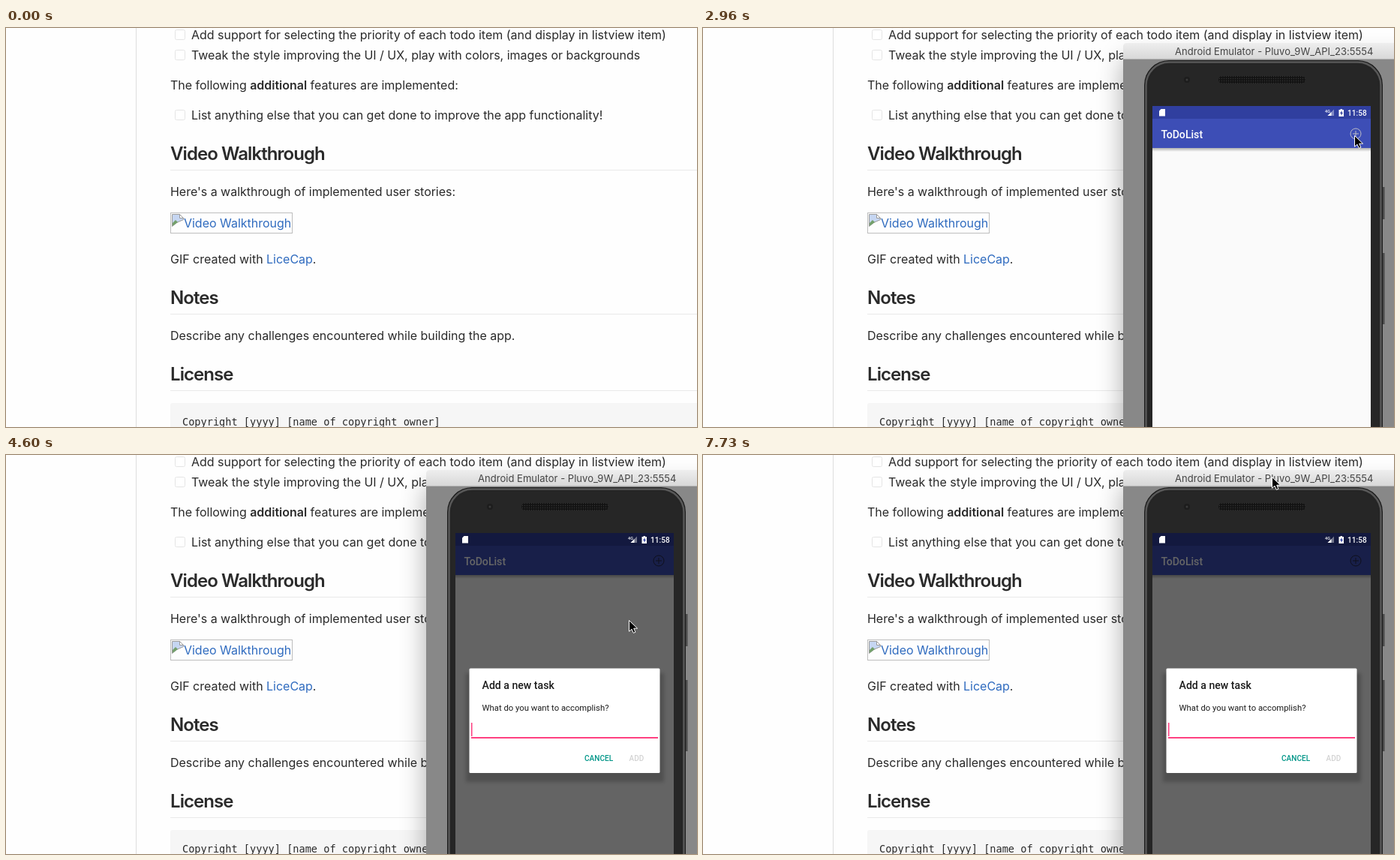
Recreate the animation shown at these times as an HTML page. Size 921 px wide and 532 px high, loop 8000 ms.

```html
<!DOCTYPE html>
<html lang="en">
<head>
<meta charset="utf-8">
<title>To-do list walkthrough</title>
<style>
  html, body { margin: 0; width: 100%; height: 100%; overflow: hidden; background: #fefefe; }
  svg { display: block; width: 921px; height: 532px; }
  text { white-space: pre; }
  .page { font: 16px Inter, sans-serif; letter-spacing: -.02px; fill: #2a2a2a; }
  .page .head { font-size: 24px; font-weight: 600; letter-spacing: -.93px; }
  .page .code { font: 13.6px "DejaVu Sans Mono", monospace; letter-spacing: 0; }
  .page .link { fill: #2f6bbf; }
  .bold { font-weight: 600; }
  .rule { stroke: #eaeaea; }
  .box { fill: #fff; stroke: #e4e4e4; }
  .title { font: 13px Inter, sans-serif; letter-spacing: .03px; fill: #444; }
  .ui { font-family: Roboto, sans-serif; }
  .med { font-weight: 500; }
</style>
</head>
<body>
<svg viewBox="0 0 921 532">
  <defs>
    <linearGradient id="bar" x2="0" y2="1">
      <stop stop-color="#eee"/><stop offset="1" stop-color="#d8d8d8"/>
    </linearGradient>
    <linearGradient id="drop" x2="0" y2="1">
      <stop stop-opacity=".3"/><stop offset="1" stop-opacity="0"/>
    </linearGradient>
    <pattern id="mesh" width="3" height="3" patternUnits="userSpaceOnUse">
      <rect width="3" height="3" fill="#131313"/><circle cx="1.5" cy="1.5" r=".7" fill="#343434"/>
    </pattern>
    <filter id="soft" x="-20%" y="-20%" width="140%" height="140%">
      <feGaussianBlur stdDeviation="17"/>
    </filter>
    <filter id="near" x="-20%" y="-20%" width="140%" height="140%">
      <feGaussianBlur stdDeviation="2.5"/>
    </filter>
    <clipPath id="screen"><path d="M599 104h291v428h-291z"/></clipPath>
  </defs>

  <rect width="921" height="532" fill="#fefefe"/>
  <path d="M173.5 0V532" stroke="#ddd"/>
  <g class="page">
    <path class="rule" d="M219 189.500H921M219 381.500H921M219 483.500H921"/>
    <rect class="box" x="225.500" y="2.500" width="13" height="13" rx="2"/>
    <rect class="box" x="225.500" y="29.500" width="13" height="13" rx="2"/>
    <rect class="box" x="225.500" y="109.500" width="13" height="13" rx="2"/>
    <text x="247" y="15">Add support for selecting the priority of each todo item (and display in listview item)</text>
    <text x="247" y="42">Tweak the style improving the UI / UX, play with colors, images or backgrounds</text>
    <text x="219" y="82">The following <tspan class="bold">additional</tspan> features are implemented:</text>
    <text x="247" y="122">List anything else that you can get done to improve the app functionality!</text>
    <text class="head" x="219" y="176">Video Walkthrough</text>
    <text x="219" y="224">Here's a walkthrough of implemented user stories:</text>
    <rect x="219.500" y="246.500" width="162" height="27" fill="none" stroke="#bdbdbd"/>
    <path d="M221.500 264.500v-16h10l5 5v2l-9 4z" fill="#c6d6f2" stroke="#9a9a9a"/>
    <path d="M222 264v-4l4-4 3 3z" fill="#74a06c"/>
    <path d="M231.500 248.500v5h5z" fill="#fff" stroke="#9a9a9a"/>
    <text class="link" x="237" y="266">Video Walkthrough</text>
    <text x="219" y="314">GIF created with <tspan class="link">LiceCap</tspan>.</text>
    <text class="head" x="219" y="368">Notes</text>
    <text x="219" y="416">Describe any challenges encountered while building the app.</text>
    <text class="head" x="219" y="470">License</text>
    <rect x="219" y="500" width="720" height="60" rx="3" fill="#f6f6f6"/>
    <text class="code" x="235" y="530">Copyright [yyyy] [name of copyright owner]</text>
  </g>

  <g id="win" visibility="hidden">
    <rect x="560" y="42" width="420" height="600" opacity=".33" filter="url(#soft)"/>
    <path d="M560 41V25q0-5 5-5H921V41z" fill="url(#bar)"/>
    <path d="M560 41.500H921" stroke="#b0b0b0"/>
    <text class="title" x="629" y="36">Android Emulator - Pluvo_9W_API_23:5554</text>
    <path d="M560 42H921V532H560z" fill="#888"/>

    <path d="M907 212v43M907 300v95" stroke="#4b4b4b" stroke-width="3"/>
    <rect x="588" y="43" width="318" height="600" rx="33" fill="#1c1c1c"/>
    <rect x="590.500" y="45.500" width="313" height="600" rx="31" fill="#252525" stroke="#585858" stroke-width="2.500"/>
    <rect x="594" y="49" width="306" height="600" rx="28" fill="#262626"/>
    <rect x="687" y="64" width="116" height="10" rx="5" fill="url(#mesh)"/>
    <circle cx="645" cy="69" r="4" fill="#1d1d1d"/>
    <circle cx="645" cy="69" r="1.500" fill="#3c3c3c"/>

    <g clip-path="url(#screen)">
      <rect x="599" y="104" width="291" height="428" fill="#fafafa"/>
      <rect x="599" y="160" width="291" height="5" fill="url(#drop)"/>
      <rect x="599" y="104" width="291" height="17" fill="#303f9f"/>
      <rect x="599" y="121" width="291" height="39" fill="#3d4eb6"/>
      <text class="ui med" x="610.500" y="146.500" font-size="14.100" fill="#fff">ToDoList</text>
      <circle id="ripple" cx="870" cy="141" r="14" fill="#fff" opacity=".1"/>
      <g id="plus" fill="none" stroke="#bcbcc6">
        <circle cx="870" cy="141" r="7"/><path d="M866 141h8M870 137v8"/>
      </g>
      <rect id="dim" x="599" y="104" width="291" height="428"/>
      <g fill="#fff">
        <path d="M610.500 108h5.500v9.500h-8v-7z"/>
        <path d="M841 108.500v8.500h-8.500z" opacity=".4"/>
        <path d="M837.500 112v5h-5z"/>
        <path d="M849.500 108h2.500v1h2v9h-6.500v-9h2z"/>
        <path d="M851.500 110l-2.500 4h1.500v3l2.500-4.200h-1.500z" fill="#303f9f"/>
        <text class="ui med" x="829" y="112.500" font-size="5.500">4G</text>
        <text class="ui med" x="859" y="116.500" font-size="10.100">11:58</text>
      </g>
      <g id="dialog">
        <rect x="613" y="291" width="264" height="145" opacity=".2" filter="url(#near)"/>
        <rect x="617.500" y="284.500" width="254" height="139.500" rx="1.500" fill="#fff"/>
        <g class="ui" fill="#1c1c1c">
          <text class="med" x="634.500" y="312" font-size="14.100">Add a new task</text>
          <text x="634.500" y="341" font-size="11.300">What do you want to accomplish?</text>
          <text class="med" x="771" y="408" font-size="10.100" fill="#009688">CANCEL</text>
          <text class="med" x="830.500" y="408" font-size="10" fill="#d3d3d3">ADD</text>
        </g>
        <rect x="620" y="376" width="249" height="2" fill="#ff4081"/>
        <rect id="caret" x="620" y="357" width="1.500" height="18" fill="#ff4081"/>
      </g>
    </g>
    <path id="cursor" d="M-.5 .5V15.200L3 12.200L5.300 17.300L7.900 16.200L5.700 11.200H10.600Z" stroke="#fff"/>
  </g>
</svg>
<script>
const $ = id => document.getElementById(id);
const show = (id, on) => $(id).setAttribute('visibility', on ? 'inherit' : 'hidden');
const LOOP = 8000;

// Pointer moves: start, end, steps, then the cubic's four points.
const moves = [
  [1040, 2070, 8, [866, 560], [768, 400], [768, 345], [838, 446]],
  [2220, 2960, 6, [838, 446], [921, 400], [921, 210], [869, 143]],
  [4000, 4000, 1, [869, 143], [867, 143], [864, 144], [862, 144]],
  [4450, 5180, 6, [862, 144], [846, 200], [772, 330], [748, 402]],
  [5780, 6680, 7, [748, 402], [826, 300], [832, 5], [757, 15]],
  [6980, 7130, 2, [757, 15], [757, 21], [756, 28], [756, 33]],
  [7430, 7730, 3, [756, 33], [757, 32], [758, 30], [759, 29]]
];
const blinks = [4000, 4450, 4950, 5480, 5930, 6530, 6980, 7430];

function bezier(u, a, b, c, d) {
  const v = 1 - u;
  return [0, 1].map(k => v*v*v*a[k] + 3*v*v*u*b[k] + 3*v*u*u*c[k] + u*u*u*d[k]);
}

function pointer(t) {
  const move = moves.filter(m => m[0] <= t).pop();
  if (!move) return null;
  const [start, end, steps, ...pts] = move;
  const gap = (end - start) / (steps - 1) || 1;
  const step = Math.min(steps, 1 + Math.floor((t - start) / gap + .05));
  return bezier(step / steps, ...pts);
}

function draw(t) {
  const open = t >= 3550, full = t >= 3700;
  show('win', t >= 450);
  show('dialog', open);
  show('ripple', open && t < 4000);
  show('caret', open && blinks.filter(b => b <= t).length % 2 === 0);
  $('dim').setAttribute('opacity', full ? .6 : open ? .27 : 0);
  $('dialog').setAttribute('opacity', full ? 1 : .8);
  $('plus').setAttribute('stroke', open ? '#222645' : '#bcbcc6');
  const p = pointer(t);
  show('cursor', p);
  if (p) $('cursor').setAttribute('transform', `translate(${p.map(Math.round)})`);
}

let begin;
function tick(now) {
  begin ??= now;
  draw((now - begin) % LOOP);
  requestAnimationFrame(tick);
}
draw(0);
requestAnimationFrame(tick);
</script>
</body>
</html>
```
